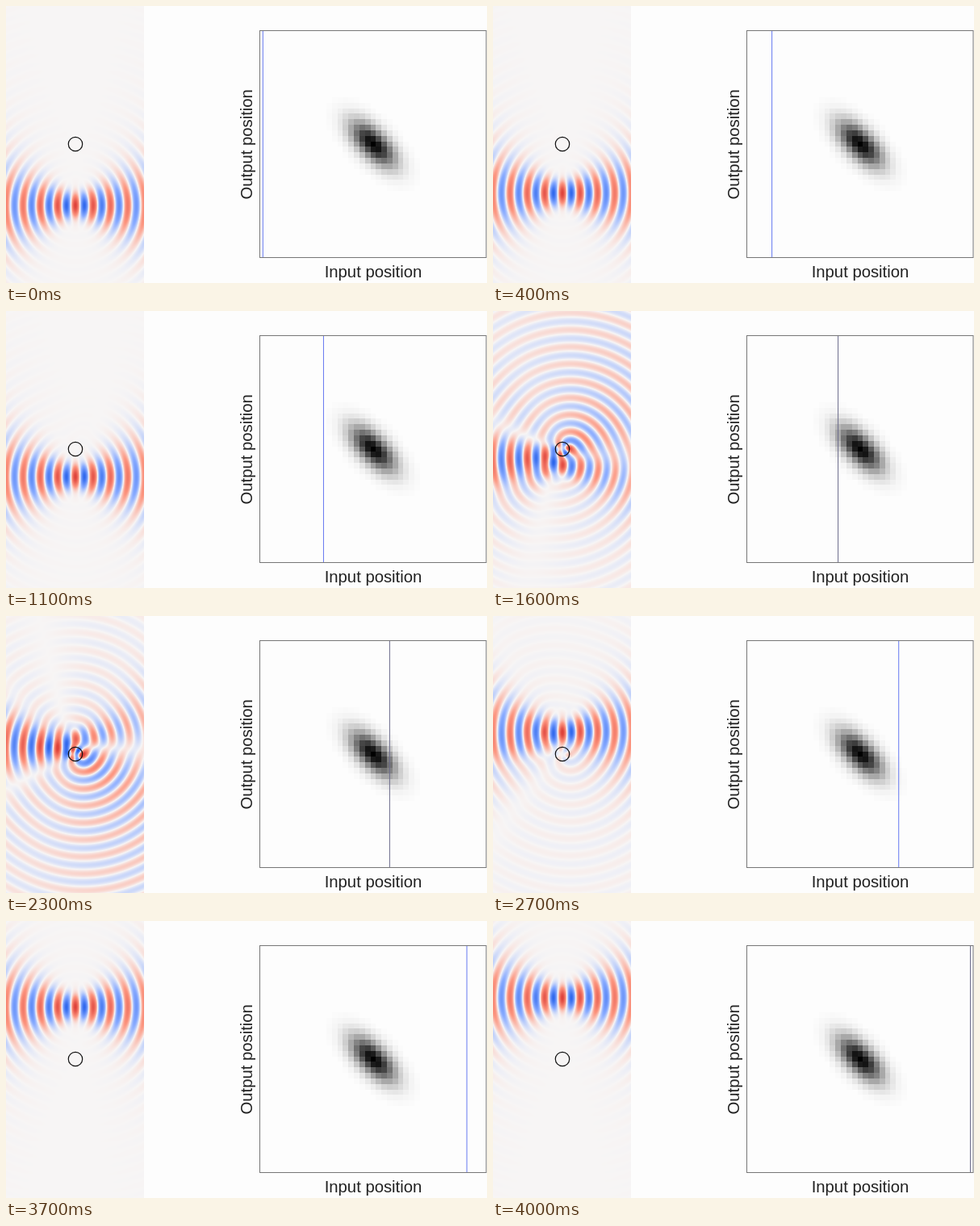
These frames come from a looping animation (596 by 343 pixels, 4100 ms). An HTML page with a canvas:

```html
<!DOCTYPE html>
<html lang="en">
<head>
<meta charset="utf-8">
<title>Beam scanning a scatterer</title>
<style>
  html, body { margin: 0; width: 596px; height: 343px; overflow: hidden; background: #fdfdfd; }
  canvas, svg { position: absolute; left: 0; top: 0; display: block; }
  text { font: 20.3px "Liberation Sans", Arial, Helvetica, sans-serif; fill: #222; text-anchor: middle; }
</style>
</head>
<body>
<canvas id="field" width="171" height="343"></canvas>
<svg width="596" height="343" viewBox="0 0 596 343">
  <circle cx="86" cy="171" r="8.7" fill="none" stroke="#111" stroke-width="1.2"/>
  <g id="cells" shape-rendering="crispEdges"></g>
  <rect x="314.5" y="30.5" width="280.5" height="281" fill="none" stroke="#777"/>
  <line id="cursor" y1="31" y2="311"/>
  <text x="455" y="335.7">Input position</text>
  <text transform="translate(304.7 171.3) rotate(-90)">Output position</text>
</svg>
<script>
const W = 171, H = 343, CX = 86, CY = 171;
const STEPS = 41, STEP_MS = 100, CELL = 6.83, PLOT_X = 314.9, PLOT_Y = 31;
const K = 2 * Math.PI / 21, RADIUS = 8.7, INDEX = 1.8, WAIST = 13, ORDERS = 6;
const { PI, sin, cos, exp, sinh, hypot } = Math;

// Integer-order Bessel functions from their integral forms
function midpoint(f, end, n) {
  const h = end / n;
  let sum = 0;
  for (let i = 0; i < n; i++) sum += f((i + 0.5) * h);
  return sum * h / PI;
}
const besselJ = (m, x) => midpoint(t => cos(m * t - x * sin(t)), PI, 160);
function besselY(m, x) {
  const sign = m % 2 ? -1 : 1;
  const tail = t => (exp(m * t) + sign * exp(-m * t)) * exp(-x * sinh(t));
  return midpoint(t => sin(x * sin(t) - m * t), PI, 400) - midpoint(tail, Math.asinh(45 / x), 200);
}
const slope = (f, m, x) => (f(m - 1, x) - f(m + 1, x)) / 2;
const mul = ([a, b], [c, d]) => [a * c - b * d, a * d + b * c];
const hankel = (m, x) => [besselJ(m, x), besselY(m, x)];

// Radial part of the scattered wave of order m, sampled every half pixel
function radialTable(m) {
  const x = K * RADIUS, z = INDEX * x;
  const inner = besselJ(m, z), innerSlope = INDEX * slope(besselJ, m, z);
  const p = besselJ(m, x) * innerSlope - slope(besselJ, m, x) * inner;
  const q = besselY(m, x) * innerSlope - slope(besselY, m, x) * inner;
  const d = p * p + q * q;
  const a = [-p * p / d, p * q / d];
  const edge = mul(a, hankel(m, x));
  const inside = [(edge[0] + besselJ(m, x)) / inner, edge[1] / inner];
  const turn = [[1, 0], [0, 1], [-1, 0], [0, -1]][m % 4];
  return Array.from({ length: 392 }, (_, i) => {
    const r = i / 2;
    if (r >= RADIUS) return mul(turn, mul(a, hankel(m, K * r)));
    const j = besselJ(m, INDEX * K * r);
    return mul(turn, [inside[0] * j - besselJ(m, K * r), inside[1] * j]);
  });
}

// Even and odd parts of each order on the pixel grid
const modes = Array.from({ length: ORDERS }, (_, m) => {
  const table = radialTable(m);
  const even = new Float32Array(W * H), odd = new Float32Array(W * H);
  for (let y = 0, i = 0; y < H; y++) {
    for (let x = 0; x < W; x++, i++) {
      const dx = x + 0.5 - CX, dy = y + 0.5 - CY;
      const s = 2 * hypot(dx, dy), n = Math.floor(s), f = s - n;
      const angle = m * Math.atan2(dy, dx);
      const [lo, hi] = [table[n], table[n + 1]];
      even[i] = (lo[0] + (hi[0] - lo[0]) * f) * cos(angle);
      odd[i] = -(lo[1] + (hi[1] - lo[1]) * f) * sin(angle);
    }
  }
  return { even, odd };
});

// Focused beam as a fan of plane waves
const fan = Array.from({ length: 64 }, (_, i) => {
  const angle = ((i + 0.5) / 64 - 0.5) * PI;
  return { angle, weight: cos(angle) * exp(-((K * WAIST * sin(angle) / 2) ** 2)) };
});
const total = fan.reduce((sum, w) => sum + w.weight, 0);
fan.forEach(w => {
  w.weight /= total;
  w.across = Float32Array.from({ length: W }, (_, x) => cos(K * cos(w.angle) * (x + 0.5 - CX)));
});
const coupling = (m, b) =>
  fan.reduce((sum, w) => sum + w.weight * cos(m * w.angle + K * b * sin(w.angle)), 0);

function addBeam(out, beamY) {
  const half = fan.slice(0, 32);
  for (let y = 0; y < H; y++) {
    for (const w of half) {
      const g = 2 * w.weight * cos(K * sin(w.angle) * (y + 0.5 - beamY));
      for (let x = 0; x < W; x++) out[y * W + x] += g * w.across[x];
    }
  }
}

function addScatter(out, b) {
  modes.forEach(({ even, odd }, m) => {
    const plus = coupling(m, b), minus = m ? coupling(-m, b) : 0;
    const s = plus + minus, d = plus - minus;
    for (let i = 0; i < out.length; i++) out[i] += s * even[i] + d * odd[i];
  });
}

const PALE = [247, 245, 245];
const RED = [PALE, [252, 150, 128], [222, 66, 58]];
const BLUE = [PALE, [138, 172, 255], [40, 98, 235]];
const ctx = document.getElementById('field').getContext('2d');
const image = ctx.createImageData(W, H);

function drawField(step) {
  const beamY = CY + 3.8 * (20 - step);
  const wave = new Float32Array(W * H);
  addBeam(wave, beamY);
  addScatter(wave, beamY - CY);
  wave.forEach((v, i) => {
    const ramp = v > 0 ? RED : BLUE, a = Math.min(1, Math.abs(v));
    const k = a < 0.4 ? 0 : 1, f = k ? (a - 0.4) / 0.6 : a / 0.4;
    for (let c = 0; c < 3; c++) image.data[4 * i + c] = ramp[k][c] + (ramp[k + 1][c] - ramp[k][c]) * f;
    image.data[4 * i + 3] = 255;
  });
  ctx.putImageData(image, 0, 0);
}

function drawCells() {
  let html = '';
  for (let j = -8; j <= 8; j++) {
    for (let i = -8; i <= 8; i++) {
      const along = (i + j) ** 2 / 2, across = (i - j) ** 2 / 2;
      const v = exp(-along / (2 * 3.5 ** 2) - across / (2 * 1.65 ** 2));
      if (v < 0.008) continue;
      const g = Math.round(253 * (1 - v));
      html += `<rect x="${PLOT_X + (20 + i) * CELL}" y="${PLOT_Y + (20 + j) * CELL}" ` +
        `width="${CELL}" height="${CELL}" fill="rgb(${g},${g},${g})"/>`;
    }
  }
  document.getElementById('cells').innerHTML = html;
}

const cursor = document.getElementById('cursor');
function drawCursor(step) {
  const x = PLOT_X + (step + 0.5) * CELL;
  const muted = (step > 13 && step < 27) || step === STEPS - 1;
  cursor.setAttribute('x1', x);
  cursor.setAttribute('x2', x);
  cursor.setAttribute('stroke', muted ? '#6b6b8a' : '#6478f0');
}

let shown = -1;
function show(step) {
  if (step === shown) return;
  shown = step;
  drawField(step);
  drawCursor(step);
}

drawCells();
show(0);
const start = performance.now();
function tick() {
  show(Math.floor((performance.now() - start) / STEP_MS) % STEPS);
  requestAnimationFrame(tick);
}
requestAnimationFrame(tick);
</script>
</body>
</html>
```
